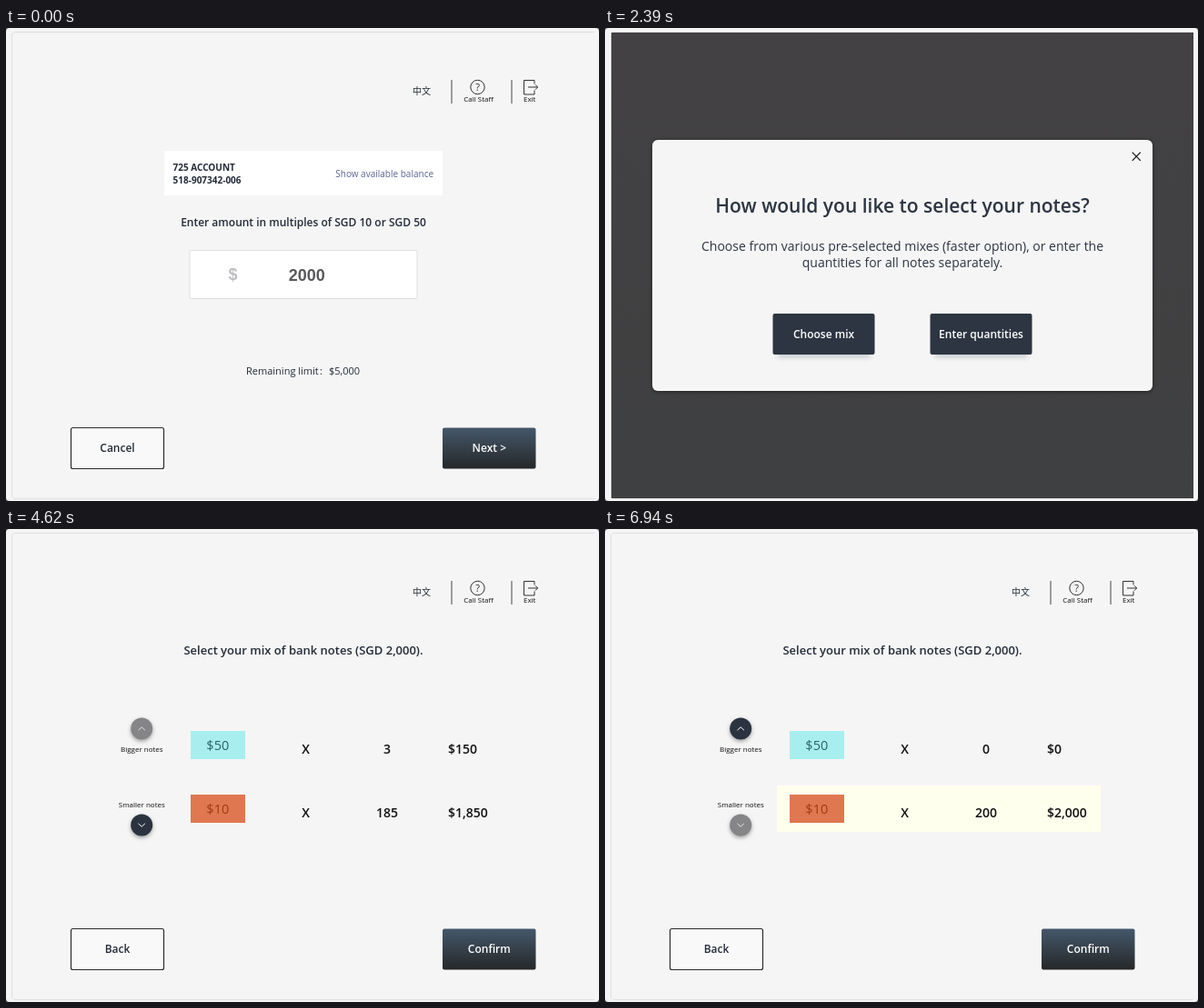
These frames come from a looping animation (652x520 px, 8000 ms). An HTML page with a canvas:

```html
<!DOCTYPE html>
<html lang="en">
<head>
<meta charset="utf-8">
<title>Cash withdrawal</title>
<style>
  html, body { margin: 0; width: 100%; height: 100%; overflow: hidden; background: #555; }
  canvas { display: block; width: 652px; height: 520px; }
</style>
</head>
<body>
<canvas id="stage"></canvas>
<script>
const W = 652, H = 520, LOOP = 8000;
const canvas = document.getElementById('stage');
const ctx = canvas.getContext('2d');
const dpr = window.devicePixelRatio || 1;
canvas.width = W * dpr;
canvas.height = H * dpr;
ctx.scale(dpr, dpr);

const SANS = '"Open Sans", sans-serif';
const ARIAL = '"Liberation Sans", Arial, sans-serif';
const CJK = '"Noto Sans CJK SC", "Noto Sans CJK", sans-serif';
const PAGE = '#f5f5f5', INK = '#232b37', NAVY = '#2d3542', LINK = '#5b6593';

function text(str, x, y, size, { weight = 400, color = INK, align = 'left', family = SANS } = {}) {
  ctx.font = `${weight} ${size}px ${family}`;
  ctx.fillStyle = color;
  ctx.textAlign = align;
  ctx.fillText(str, x, y);
}

const centered = (str, x, y, size, weight = 400, color = INK) =>
  text(str, x, y, size, { weight, color, align: 'center' });

function box(x, y, w, h, fill, radius = 0) {
  ctx.beginPath();
  ctx.roundRect(x, y, w, h, radius);
  ctx.fillStyle = fill;
  ctx.fill();
}

function outline(x, y, w, h, color, width = 1, radius = 0) {
  ctx.beginPath();
  ctx.roundRect(x, y, w, h, radius);
  ctx.strokeStyle = color;
  ctx.lineWidth = width;
  ctx.stroke();
}

function line(color, width, ...points) {
  ctx.beginPath();
  points.forEach(([x, y], i) => i ? ctx.lineTo(x, y) : ctx.moveTo(x, y));
  ctx.strokeStyle = color;
  ctx.lineWidth = width;
  ctx.stroke();
}

function shadowed(color, blur, dy, draw) {
  ctx.save();
  ctx.shadowColor = color;
  ctx.shadowBlur = blur * dpr;
  ctx.shadowOffsetY = dy * dpr;
  draw();
  ctx.restore();
}

function vertical(y0, y1, from, to) {
  const g = ctx.createLinearGradient(0, y0, 0, y1);
  g.addColorStop(0, from);
  g.addColorStop(1, to);
  return g;
}

function page() {
  ctx.fillStyle = '#555';
  ctx.fillRect(0, 0, W, H);
  box(0, 0, W, H, PAGE, 4);
  line('#dedfdf', 1, [647, 4.5], [9, 4.5], [6.5, 7], [6.5, 515], [9, 517.5], [647, 517.5]);
}

function header() {
  text('中文', 447, 73, 10, { family: CJK });
  box(489, 57, 2, 26, '#9d9d9d');
  box(555, 57, 2, 26, '#9d9d9d');

  ctx.beginPath();
  ctx.arc(518.5, 65, 7.7, 0, Math.PI * 2);
  ctx.strokeStyle = '#333';
  ctx.lineWidth = 1;
  ctx.stroke();
  centered('?', 518.5, 69, 11, 400, '#333');
  centered('Call Staff', 519.5, 81, 8, 400, '#111');

  line('#333', 1, [581, 61.5], [581, 57.5], [569.5, 57.5], [569.5, 73], [581, 73], [581, 68.5]);
  line('#333', 1, [574, 65], [584.5, 65]);
  line('#333', 1, [582, 62.3], [584.7, 65], [582, 67.7]);
  centered('Exit', 575.7, 81, 8, 400, '#111');
}

function footer(back, next) {
  box(71, 439, 103, 46, '#f9f9f9', 2);
  outline(71.5, 439.5, 102, 45, '#2b2b2b', 1.2, 2);
  centered(back, 122.5, 466, 12, 600);
  box(480, 439.5, 102.5, 45, vertical(440, 484, '#44576a', '#262829'), 2);
  centered(next, 531.3, 466, 12, 600, '#fff');
}

function account(left, right, y) {
  text('725 ACCOUNT', left, y, 10, { weight: 700 });
  text('518-907342-006', left, y + 14.7, 10, { weight: 700 });
  text('Show available balance', right, y + 7, 10, { color: LINK, align: 'right' });
}

function amountScreen() {
  page();
  header();
  box(174, 135, 306, 49, '#fff');
  account(183.6, 470, 156.6);
  centered('Enter amount in multiples of SGD 10 or SGD 50', 327, 218, 12, 600);
  box(202, 244.5, 250, 53, '#fff', 1);
  outline(202, 244.5, 250, 53, '#dedede', 1, 1);
  text('$', 244.5, 276.5, 18, { weight: 700, color: '#bdbdc1', family: ARIAL });
  text('2000', 330.7, 277.5, 18, { weight: 700, color: '#59595b', align: 'center', family: ARIAL });
  text('Remaining limit', 264, 381, 11);
  text(':', 345, 381, 11);
  text('$5,000', 355, 381, 11);
  footer('Cancel', 'Next >');
}

function confirmScreen() {
  page();
  header();
  centered('Please confirm your withdrawal', 327, 125, 14, 600);
  box(162, 151, 330, 81, '#fff');
  text('Amount withdrawn', 172, 178, 12, { weight: 700 });
  text('$ 2,000.00', 482, 178, 12, { weight: 700, align: 'right' });
  line('#d4d5d6', 1, [162, 191.5], [492, 191.5]);
  centered('Select denominations', 327, 216, 12, 400, LINK);
  box(162, 245, 328, 51, '#fff');
  account(171.6, 480, 267.2);
  footer('Back', 'Confirm');
}

function modalButton(label, x) {
  shadowed('rgba(70,90,120,.22)', 5, 4, () => box(x + 5, 318, 102, 41, NAVY, 2));
  box(x, 314, 112, 45, NAVY, 2);
  centered(label, x + 56, 341, 12, 600, '#fff');
}

function choiceScreen() {
  page();
  box(7, 5, 640, 512, vertical(5, 517, '#434143', '#3f4041'));
  shadowed('rgba(0,0,0,.5)', 4, 1, () => box(52, 123, 550, 276, PAGE, 6));
  line('#111', 1.2, [579.7, 136.7], [588.8, 145.8]);
  line('#111', 1.2, [588.8, 136.7], [579.7, 145.8]);
  centered('How would you like to select your notes?', 327, 203, 21, 600, NAVY);
  centered('Choose from various pre-selected mixes (faster option), or enter the', 327, 244.5, 14, 400, NAVY);
  centered('quantities for all notes separately.', 327, 262.5, 14, 400, NAVY);
  modalButton('Choose mix', 184.5);
  modalButton('Enter quantities', 357.5);
}

function arrowButton(y, dir, active) {
  shadowed('rgba(0,0,0,.35)', 4, 2, () => {
    ctx.beginPath();
    ctx.arc(149.2, y, 12, 0, Math.PI * 2);
    ctx.fillStyle = active ? '#2b3340' : '#858587';
    ctx.fill();
  });
  line(active ? '#fff' : '#e4e4e4', 1, [145.5, y - dir * 1.7], [149.2, y + dir * 1.7], [152.9, y - dir * 1.7]);
}

function noteRow(y, value, count, tile, ink) {
  box(203, y, 60, 31, tile);
  centered('$' + value, 232.8, y + 21, 14.5, 400, ink);
  const base = y + 24.5;
  centered('X', 329.5, base, 14, 600, '#111');
  centered(count, 419, base, 14, 600, '#111');
  text('$' + (value * count).toLocaleString('en-US'), 486, base, 14, { weight: 600, color: '#111' });
}

function mixScreen({ fifties, tens, up, down, lit }) {
  page();
  header();
  centered('Select your mix of bank notes (SGD 2,000).', 327, 137.5, 13, 600);
  if (lit) box(189, 282, 356, 51, '#ffffee');
  arrowButton(219.5, -1, up);
  centered('Bigger notes', 149.3, 245, 8, 400, '#111');
  centered('Smaller notes', 149.3, 306, 8, 400, '#111');
  arrowButton(325.5, 1, down);
  noteRow(222, 50, fifties, '#a9eeee', '#2b626a');
  noteRow(292, 10, tens, '#df7750', '#a13a12');
  footer('Back', 'Confirm');
}

const scenes = [
  [0, amountScreen],
  [500, confirmScreen],
  [2390, choiceScreen],
  [3370, () => mixScreen({ fifties: 0, tens: 0, down: true })],
  [3440, () => mixScreen({ fifties: 3, tens: 185, down: true })],
  [5400, () => mixScreen({ fifties: 1, tens: 195, up: true, down: true, lit: true })],
  [6940, () => mixScreen({ fifties: 0, tens: 200, up: true, lit: true })],
];

const start = performance.now();

function frame() {
  const t = (performance.now() - start) % LOOP;
  const [, draw] = scenes.findLast(([at]) => at <= t);
  draw();
  requestAnimationFrame(frame);
}
frame();
</script>
</body>
</html>
```
